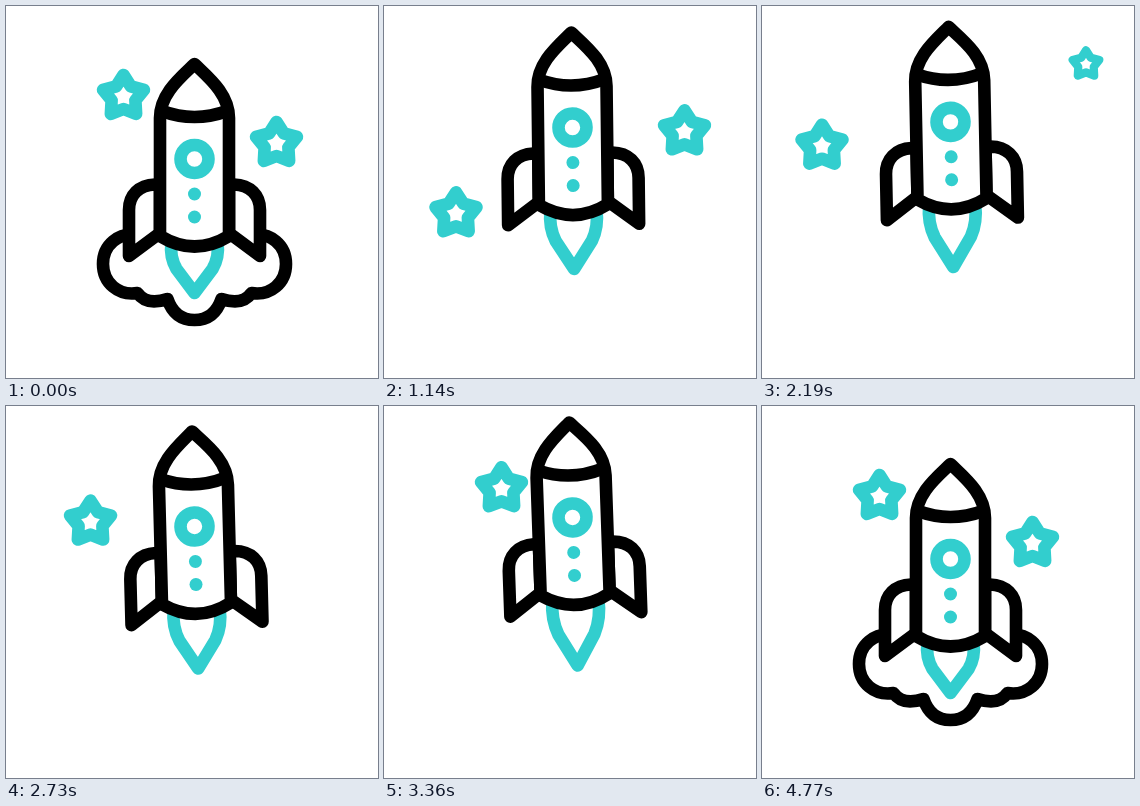
Animation, 372 px wide and 372 px high, one loop 5.16 s. Source, as an HTML page:

```html
<!DOCTYPE html>
<html lang="en">
<head>
<meta charset="utf-8">
<title>Rocket</title>
<style>
  html, body { margin: 0; width: 100%; height: 100%; overflow: hidden; background: #fff; }
  svg { display: block; width: 100%; height: 100%; }
  path, circle { stroke-width: 12.6; stroke-linecap: round; stroke-linejoin: round; }
  .line { fill: #fff; stroke: #000; }
  .cyan { fill: #fff; stroke: #32cece; }
  .dot { fill: #32cece; }
  .open { fill: none; }
</style>
</head>
<body>
<svg viewBox="0 0 372 372">
  <path id="smoke" class="line open"/>
  <path id="left" class="cyan"/>
  <path id="right" class="cyan"/>
  <g id="rocket">
    <path id="flame" class="cyan"/>
    <path class="line" d="M154 178.5H149C133 179 123 189 123 204V250L154 227Z"/>
    <path class="line" d="M223 178.5H228C244 179 254 189 254 204V250L223 227Z"/>
    <path class="line" d="M188.5 58C174 72 154 88 154 112V230Q188.5 251 223 230V112C223 88 203 72 188.5 58Z"/>
    <path class="line open" d="M156 105Q188.5 117 221 105"/>
    <circle class="cyan" cx="188.5" cy="153" r="14"/>
    <circle class="dot" cx="188.5" cy="188" r="6.5"/>
    <circle class="dot" cx="188.5" cy="211" r="6.5"/>
  </g>
</svg>
<script>
const LOOP = 5160, STEP = 30, LAUNCH = 180, REST = 4770;
const MID = 188.5, GROUND = 314;
const TOP = 36, BOTTOM = 268, SPEED = 0.65;
const FIRST = 878, EVERY = 577, ENTER = 3288, RISE = 35;

const $ = id => document.getElementById(id);
const clamp = x => Math.max(0, Math.min(1, x));
const span = (t, from, to) => clamp((t - from) / (to - from));
const smooth = x => x * x * (3 - 2 * x);
const back = x => x * x * (3.1 * x - 2.1);

const stars = [
  { el: $('left'), x: 117.5, y: 89, lag: 0, lanes: [72, 95, 60, 84.5] },
  { el: $('right'), x: 270.5, y: 136, lag: 126, lanes: [300.5, 285.5, 324, 289] }
];

// swells before it collapses, and overshoots when it returns
const puff = (t, gone, born) =>
  1 - back(t < 2000 ? span(t, LAUNCH, gone) : 1 - span(t, born, REST));

function starPath(x, y, size) {
  let d = '';
  for (let i = 0; i < 10; i++) {
    const r = (i % 2 ? 12.5 : 21.5) * size, a = i * Math.PI / 5;
    d += `${i ? 'L' : 'M'}${x + r * Math.sin(a)} ${y + 1.5 - r * Math.cos(a)}`;
  }
  return d + 'Z';
}

function starPose(s, time) {
  const t = time - s.lag;
  if (t >= ENTER) {
    const drop = s.y - TOP + RISE;
    const fall = 1 - (1 - span(t, ENTER, ENTER + 2.7 * drop)) ** 2;
    return [s.x, TOP + drop * fall - RISE * smooth(span(t, 3700, 4350))];
  }
  const lane = Math.floor((t - FIRST) / EVERY);
  if (lane >= 0) return [s.lanes[lane], TOP + SPEED * ((t - FIRST) % EVERY)];
  return [s.x, s.y + 32 * (Math.max(0, time - LAUNCH - s.lag * 0.8) / 450) ** 3.6];
}

function smokePath(sx, sy) {
  const cy = GROUND - 56 * sy;
  let d = '';
  for (const mx of [-1, 1]) for (const my of [-1, 1]) {
    const p = (x, y) => `${MID + mx * x * sx} ${cy + my * y * sy} `;
    const [dip, peak] = my < 0 ? [43, 47] : [35, 56];
    d += `M${p(91.5, 0)}C${p(91.5, 19)}${p(76, 32)}${p(57, 29)}` +
      `Q${p(48, 42)}${p(27, dip)}Q${p(20, peak)}${p(0, peak)}`;
  }
  return d;
}

function flamePath(k) {
  const p = (x, y) => `${MID + x} ${240 + y * k} `;
  return `M${p(-23, -4)}Q${p(-25, 11)}${p(-18, 23)}L${p(0, 47)}` +
    `L${p(18, 23)}Q${p(25, 11)}${p(23, -4)}`;
}

function show(el, visible, d) {
  el.style.display = visible ? '' : 'none';
  if (visible) el.setAttribute('d', d);
}

function draw(now) {
  const t = Math.floor(now % LOOP / STEP) * STEP;

  const flight = smooth(span(t, LAUNCH, 772)) - smooth(span(t, 3390, 4149));
  const bob = Math.cos((t - 780) / 815 * 2 * Math.PI);
  const lift = -flight * (38 + 7 * bob);
  const tilt = -flight * (0.5 + 2 * (t / 3900) ** 2);
  $('rocket').setAttribute('transform', `translate(0 ${lift}) rotate(${tilt} ${MID} 153)`);

  const choke = Math.sin(Math.PI * span(t, LAUNCH, 900)) ** 2;
  $('flame').setAttribute('d', flamePath(1 + flight * (0.25 + 0.1 * bob) - 0.5 * choke));

  const wide = puff(t, 700, 3425), tall = puff(t, 682, 3562);
  show($('smoke'), wide > 0.04, smokePath(wide, Math.max(0, tall)));

  for (const s of stars) {
    const [x, y] = starPose(s, t);
    const size = clamp((y - TOP) / 32) * clamp((BOTTOM - y) / 20);
    s.el.style.strokeWidth = 12.6 * size;
    show(s.el, size > 0.02, starPath(x, y, size));
  }
}

function tick() {
  draw(performance.now());
  requestAnimationFrame(tick);
}
tick();
</script>
</body>
</html>
```
